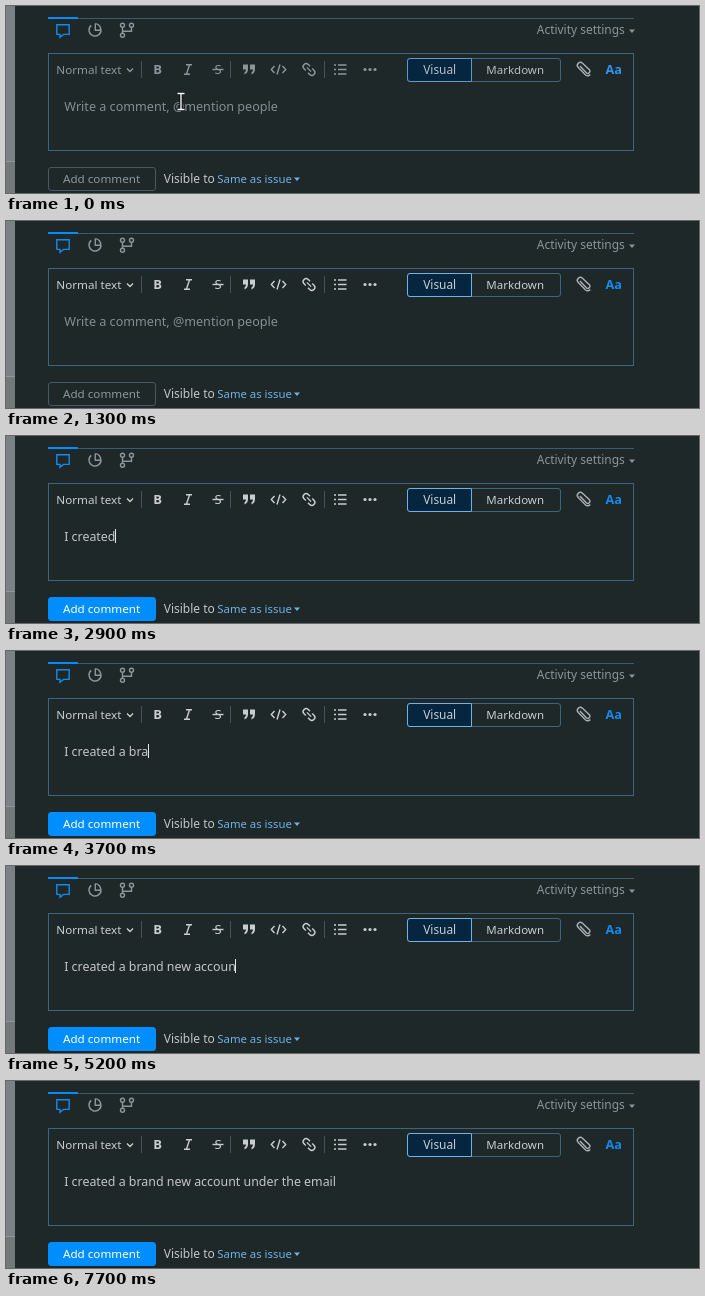
An HTML page that plays this animation: 693x187 px, repeating every 8 s.

```html
<!DOCTYPE html>
<html lang="en">
<head>
<meta charset="utf-8">
<title>Comment editor</title>
<style>
  html, body { margin: 0; width: 100%; height: 100%; overflow: hidden; background: #1f2829; }
  svg { display: block; width: 693px; height: 187px; }
  text { font-family: "Noto Sans", "Open Sans", sans-serif; white-space: pre; }
  .icon { fill: none; stroke: currentColor; stroke-width: 1.4; }
  .solid { fill: currentColor; stroke: none; }
  .border { fill: none; stroke: #406380; }
  .crisp { shape-rendering: crispEdges; }
</style>
</head>
<body>
<svg viewBox="0 0 693 187">
  <!-- page edge -->
  <rect width="9" height="187" fill="#7b8285"/>
  <rect y="155" width="9" height="32" fill="#737879"/>
  <rect y="155" width="9" height="1" fill="#92989a"/>

  <!-- activity tabs -->
  <g class="crisp">
    <rect x="42" y="12" width="586" height="1" fill="#3c5a70"/>
    <rect x="42" y="11" width="30" height="2" fill="#008eff"/>
  </g>
  <path class="icon" color="#1589ec" d="M50.8 18.8H63.2V28.4H57.5L54 31.3V28.4H50.8Z"/>
  <g class="icon" color="#8b969b">
    <path d="M85.2 19.4A6 6 0 1 0 95 23.5M89.3 17.6V24.2H94.6A5.8 5.8 0 0 0 89.3 17.6"/>
    <circle cx="116.5" cy="19.3" r="2"/>
    <circle cx="116.5" cy="29.2" r="2"/>
    <circle cx="125.5" cy="19.3" r="2"/>
    <path d="M116.5 21.3V27.2M125.5 21.3V25.3H116.5"/>
  </g>
  <g fill="#8b959a">
    <text x="530.8" y="28.3" font-size="11.95">Activity settings</text>
    <path d="M623 23.5H629L626 27Z"/>
  </g>

  <!-- editor -->
  <rect class="border crisp" x="42.5" y="47.5" width="585" height="97"/>
  <g id="toolbar">
    <text class="solid" x="50.3" y="67.7" font-size="11.65">Normal text</text>
    <path class="icon" d="M121 62.5L124 65.5L127 62.5"/>
    <text class="solid" x="147.3" y="68" font-size="13" font-weight="700">B</text>
    <path class="icon" d="M180 58.7H186M178 68.3H184M183.6 58.7L180.4 68.3"/>
    <text class="solid" x="208.4" y="68" font-size="13">S</text>
    <path class="icon" stroke-width="1" d="M206.5 63.5H217.5"/>
    <path class="solid" d="M237 58.5H242V63Q242 67 238.5 68.5V66.5Q240 65.5 240 63.5H237ZM244 58.5H249V63Q249 67 245.500 68.5V66.500Q247 65.500 247 63.5H244Z"/>
    <path class="icon" d="M268.500 60L265.300 63.500L268.500 67M276.500 60L279.700 63.500L276.500 67M274 58.500L271 68.500"/>
    <g class="icon" transform="rotate(45 303 63.500)">
      <path d="M301.500 60.500H299A3 3 0 0 0 299 66.500H301.500M304.500 60.500H307A3 3 0 0 1 307 66.500H304.500M300 63.500H306"/>
    </g>
    <path class="icon" d="M332 59H340.500M332 63.500H340.500M332 68H340.500M328 59H330M328 63.500H330M328 68H330"/>
    <g class="solid">
      <circle cx="359" cy="63.500" r="1.600"/><circle cx="364" cy="63.500" r="1.600"/><circle cx="369" cy="63.500" r="1.600"/>
    </g>
  </g>
  <path class="crisp" stroke="#465257" d="M135.500 55V72M224.500 55V72M318.500 55V72"/>

  <!-- mode switch -->
  <rect class="border" x="401.500" y="52.500" width="153" height="23" rx="2.500"/>
  <path id="selected" fill="#062640" d="M404 52.500H465.500V75.500H404A2.500 2.500 0 0 1 401.500 73V55A2.500 2.500 0 0 1 404 52.500Z"/>
  <g id="modes">
    <text class="solid" x="417.200" y="67.700" font-size="11.900">Visual</text>
    <text class="solid" x="480.300" y="67.700" font-size="11.500">Markdown</text>
  </g>
  <path class="icon" color="#a9b1b5" stroke-width="1.200" d="M574 60L580.500 67A2.200 2.200 0 0 0 583.600 64L576.500 57.300A3 3 0 0 0 572.300 61.600L579.300 68.700A3.600 3.600 0 0 0 584.300 68.600"/>
  <text id="format" x="599.500" y="68" font-size="12.700" font-weight="600">Aa</text>

  <!-- message -->
  <text id="placeholder" x="58.300" y="104.800" font-size="12.600" fill="#838e93">Write a comment, @mention people</text>
  <text id="message" x="58.200" y="104.800" font-size="12.400" fill="#c2c6c8"></text>
  <rect id="caret" class="crisp" y="93" width="1" height="14" fill="#e2e5e6"/>

  <!-- footer -->
  <rect id="button" x="42.500" y="161.500" width="107" height="23" rx="2.500"/>
  <text id="buttonLabel" x="57" y="177.200" font-size="11.650">Add comment</text>
  <text x="157.700" y="177.200" font-size="12" fill="#c2c6c8">Visible to</text>
  <g fill="#70b1e6">
    <text x="211.300" y="177.200" font-size="11.350">Same as issue</text>
    <path d="M288 171.500H294L291 175Z"/>
  </g>

  <!-- text pointer, centred on its origin -->
  <g id="pointer" fill="none">
    <path id="beam" d="M-3.500 -8H-1Q0 -8 0 -7Q0 -8 1 -8H3.500M0 -7V7M-3.500 8H-1Q0 8 0 7Q0 8 1 8H3.500" stroke="#10171a" stroke-width="3"/>
    <use href="#beam" style="stroke:#fff"/>
    <path d="M-3.500 -8H3.500M0 -8V8M-3.500 8H3.500" stroke="#fff" stroke-width="1.300"/>
  </g>
</svg>
<script>
const LOOP = 8000, STEP = 100;
const MESSAGE = "I created a brand new account under the email ";

// Typing bursts: start time, then the typed length at each step.
const BURSTS = [
  [2000, 1, 3, 4], [2400, 5, 6], [2700, 8], [2900, 9, 10], [3200, 11, 12],
  [3500, 13, 14, 15], [3900, 17, 18], [4200, 19, 20, 21, 22, 23, 24],
  [4900, 26, 27], [5200, 28, 29, 30, 31, 32], [5800, 33, 34, 35, 36],
  [6300, 38], [6500, 40, 41, 42], [6900, 43, 45, 46]
];
const POINTER_PATH = [[0, 175, 95.5], [100, 172, 96.5], [200, 170.5, 97], [400, 167, 104], [500, 164.5, 109]];

const el = id => document.getElementById(id);
const progress = (t, from, to) => Math.min(1, Math.max(0, (t - from) / (to - from)));
const mix = (a, b, k) => `rgb(${a.map((v, i) => Math.round(v + (b[i] - v) * k))})`;
const show = (id, on) => el(id).setAttribute("visibility", on ? "visible" : "hidden");

function typedLength(t) {
  let length = 0;
  for (const [start, ...lengths] of BURSTS)
    if (t >= start) length = lengths[Math.min(lengths.length - 1, Math.floor((t - start) / STEP))];
  return length;
}

function draw(time) {
  const t = Math.floor((time % LOOP) / STEP) * STEP;

  const focus = progress(t, 600, 1100);
  el("toolbar").style.color = mix([139, 150, 155], [200, 205, 208], focus);
  el("modes").style.color = mix([182, 190, 194], [200, 205, 208], focus);
  el("selected").setAttribute("stroke", mix([96, 152, 198], [112, 177, 230], focus));
  el("format").setAttribute("fill", mix([48, 148, 238], [21, 137, 236], progress(t, 0, 200)));

  const length = typedLength(t);
  const message = el("message");
  message.textContent = MESSAGE.slice(0, length);
  show("placeholder", length === 0);
  const caretX = length ? Math.floor(58.2 + message.getComputedTextLength()) : 59;
  el("caret").setAttribute("x", caretX);
  show("caret", (t >= 800 && t < 1300) || (t >= 2000 && t < 7700));

  const enabled = progress(t, 1900, 2100);
  el("button").setAttribute("fill", mix([31, 40, 41], [0, 142, 255], enabled));
  el("button").setAttribute("stroke", mix([71, 89, 101], [0, 142, 255], enabled));
  el("buttonLabel").setAttribute("fill", mix([139, 150, 155], [255, 255, 255], enabled));

  const [, x, y] = POINTER_PATH.findLast(([at]) => t >= at);
  el("pointer").setAttribute("transform", `translate(${x} ${y})`);
  show("pointer", t < 800);
}

const start = performance.now();
function tick() {
  draw(performance.now() - start);
  requestAnimationFrame(tick);
}
tick();
</script>
</body>
</html>
```
